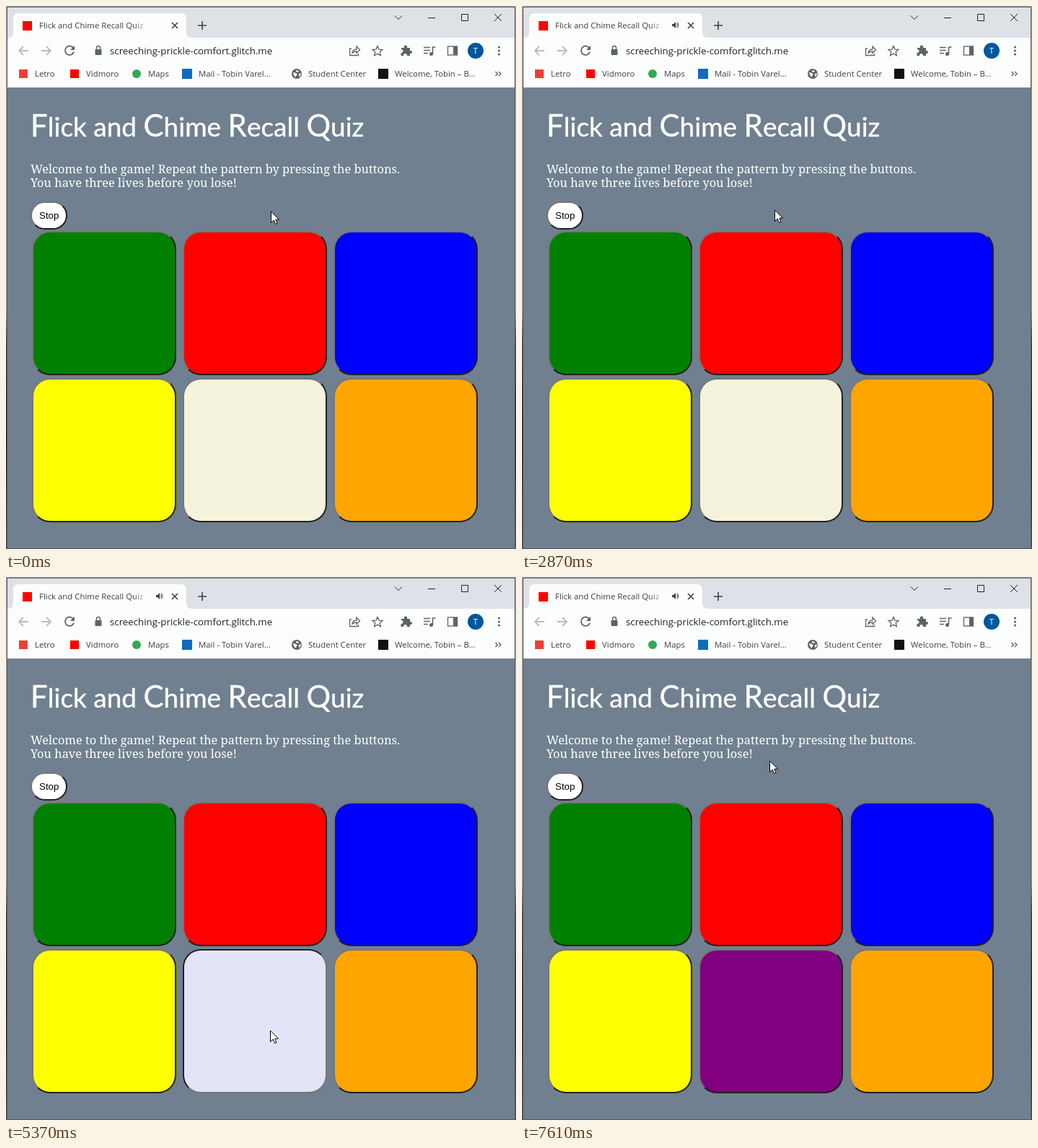
These frames come from a looping animation (707 px wide and 753 px high, 8000 ms). An HTML page:

```html
<!DOCTYPE html>
<html lang="en">
<head>
<meta charset="utf-8">
<title>Flick and Chime Recall Quiz</title>
<style>
html, body { margin: 0; width: 100%; height: 100%; overflow: hidden; }
body { position: relative; background: #708090; }
svg, .tile, .stop { position: absolute; left: 0; top: 0; }
text { font-family: "Open Sans", sans-serif; fill: #3c4043; }
.small { font-size: 11.4px; }
.address { font-size: 13.3px; fill: #202124; }
.heading { font: 37px Lato, sans-serif; fill: #fff; stroke: #fff; stroke-width: .4; }
.heading .cap { font-size: 42px; }
.intro { font: 16.4px "Noto Serif", serif; fill: #fff; }
.line { fill: none; stroke: #5f6368; stroke-width: 1.8; }
.thin { fill: none; stroke: #222; stroke-width: 1; }
.solid { fill: #5f6368; }

.tile, .stop {
  box-sizing: border-box;
  border: 2px solid;
  border-color: #767676 #212121 #212121 #767676;
}
.tile { width: 200px; height: 200px; border-radius: 25px; }
.stop {
  left: 34px; top: 271px; padding: 10px; border-radius: 25px;
  background: #fff; color: #000;
  font: 13.333px/15px "Liberation Sans", Arial, sans-serif;
}

#purple, #blue, #cursor, #speaker { animation: 8s step-end infinite; }
#purple { animation-name: purple; }
#blue { animation-name: blue; }
#cursor { animation-name: point; overflow: visible; }
#speaker { animation-name: speaker; }

@keyframes purple {
  0%, 32.375%, 86.25% { background: #f5f3dc; }
  6.875%, 43.25%, 95.125%, 100% { background: #800080; }
  20.125%, 65.625% { background: #e4e4f8; border-color: #212121 #767676 #767676 #212121; }
  21.625%, 67.5% { background: #800080; border-color: #767676 #212121 #212121 #767676; }
}
@keyframes blue {
  0%, 57.125% { background: #00f; }
  48.625% { background: #add8e6; }
  72.25% { background: #e4e4f8; border-color: #212121 #767676 #767676 #212121; }
  74.25%, 100% { background: #00f; border-color: #767676 #212121 #212121 #767676; }
}
@keyframes speaker {
  0% { opacity: 0; }
  1.5% { opacity: .5; }
  3.375%, 100% { opacity: 1; }
}
@keyframes point {
  0% { transform: translate(367px, 284px); }
  10.25% { transform: translate(364px, 330px); }
  11.75% { transform: translate(359px, 470px); }
  13.25% { transform: translate(364px, 595px); }
  14.75% { transform: translate(369px, 638px); }
  23.375% { transform: translate(369px, 600px); }
  25.125% { transform: translate(364px, 500px); }
  27% { transform: translate(357px, 390px); }
  28.75% { transform: translate(352px, 310px); }
  30.5% { transform: translate(350px, 284px); }
  32.375% { transform: translate(350px, 283px); }
  35.875% { transform: translate(350px, 282px); }
  50.5% { transform: translate(350px, 290px); }
  52.125% { transform: translate(351px, 330px); }
  53.75% { transform: translate(355px, 410px); }
  55.375% { transform: translate(360px, 510px); }
  57.125% { transform: translate(365px, 600px); }
  58.75% { transform: translate(366px, 628px); }
  69% { transform: translate(400px, 560px); }
  70.5% { transform: translate(470px, 450px); }
  72.25% { transform: translate(524px, 376px); }
  77.375% { transform: translate(498px, 312px); }
  79.25% { transform: translate(430px, 277px); }
  80.875% { transform: translate(370px, 258px); }
  82.625% { transform: translate(344px, 252px); }
  89.75% { transform: translate(344px, 253px); }
  91.625%, 100% { transform: translate(343px, 254px); }
}
</style>
</head>
<body>
<svg width="707" height="753">
  <defs>
    <linearGradient id="fade">
      <stop offset="0" stop-color="#fcfdfd" stop-opacity="0"/>
      <stop offset="1" stop-color="#fcfdfd"/>
    </linearGradient>
    <linearGradient id="edge" x2="0" y2="1">
      <stop offset="0" stop-color="#a4a6aa"/>
      <stop offset=".56" stop-color="#a4a6aa"/>
      <stop offset=".62" stop-color="#4a3438"/>
      <stop offset=".8" stop-color="#181414"/>
      <stop offset="1" stop-color="#4c4c50"/>
    </linearGradient>
  </defs>

  <!-- window and tab strip -->
  <rect width="707" height="753" fill="url(#edge)"/>
  <rect x="1" y="1" width="705" height="752" fill="#55595e"/>
  <rect x="2" y="2" width="703" height="42" fill="#dee1e6"/>
  <rect x="2" y="44" width="703" height="69" fill="#fcfdfd"/>
  <rect x="2" y="113" width="703" height="639" fill="#708090"/>
  <path d="M2 44q8 0 8-8V18q0-8 8-8H242q8 0 8 8V36q0 8 8 8Z" fill="#fcfdfd"/>
  <rect x="23" y="21" width="13" height="13" fill="#f00"/>
  <text class="small" x="46" y="31">Flick and Chime Recall Quiz</text>
  <rect x="176" y="18" width="22" height="18" fill="url(#fade)"/>
  <rect x="198" y="18" width="20" height="18" fill="#fcfdfd"/>
  <g id="speaker">
    <path d="M208 25h2l3-3v9l-3-3h-2Z" fill="#3c4043"/>
    <path d="M214.500 24.500q1.500 2 0 4M215.500 22.500q3 4 0 8" fill="none" stroke="#3c4043"/>
  </g>
  <path class="line" style="stroke:#3c4043;stroke-width:1.600" d="M230 23l8 8m0-8l-8 8M266 27h12m-6-6v12"/>
  <path class="thin" d="M539 13.500l5 5 5-5M585 16.500h10M631.500 11.500h9v9h-9ZM677 11l10 10m0-10l-10 10"/>

  <!-- toolbar -->
  <path class="line" style="stroke:#babcbe" d="M31 62H18m6-6l-6 6 6 6M49 62h13m-6-6l6 6-6 6"/>
  <path class="line" d="M93.500 58.500a6.200 6.200 0 1 0 .6 5"/>
  <path class="solid" d="M95 55v6h-6Z"/>
  <rect class="solid" x="123.500" y="60" width="9" height="8" rx="1"/>
  <path class="line" style="stroke-width:1.400" d="M125.500 60v-2a2.500 2.500 0 0 1 5 0v2"/>
  <text class="address" x="144" y="67">screeching-prickle-comfort.glitch.me</text>
  <g class="line" style="stroke-width:1.300">
    <path d="M479 59h-2.500v9.500h12V66M480 65q1-5 6-5v-4l4.500 5-4.500 4.500V63q-4 0-6 2Z"/>
    <path d="M515 55.500l2 4.600 5 .4-3.800 3.300 1.200 4.900-4.400-2.600-4.400 2.600 1.200-4.900-3.800-3.300 5-.4Z"/>
    <rect x="612.500" y="56" width="13" height="12"/>
  </g>
  <path class="solid" d="M548 58h4q-1-3.500 2-3.500t2 3.500h4v4q3-.5 3 2t-3 2v3h-4q0-3-2.500-3t-2.500 3h-3.500v-4q3 0 3-2.500t-2.500-2.500ZM620 56h6v12h-6Z"/>
  <path class="line" style="stroke-width:1.600" d="M579 57.500h9m-9 4h9m-9 4h6M591.500 66v-9h4"/>
  <circle class="solid" cx="589.500" cy="66.500" r="2.500"/>
  <circle cx="651" cy="62" r="11" fill="#00579c"/>
  <text class="small" x="651" y="66" text-anchor="middle" style="fill:#fff">T</text>
  <g class="solid">
    <circle cx="683.500" cy="57" r="1.600"/>
    <circle cx="683.500" cy="62" r="1.600"/>
    <circle cx="683.500" cy="67" r="1.600"/>
  </g>

  <!-- bookmarks -->
  <rect x="18" y="88" width="12" height="12" fill="#e94235"/>
  <rect x="89" y="88" width="12" height="12" fill="#f00"/>
  <circle cx="181" cy="94" r="6" fill="#34a853"/>
  <rect x="244" y="87" width="14" height="14" fill="#0f6cbd"/>
  <circle class="solid" cx="403" cy="94" r="7"/>
  <path d="M398 92l4 1 2 2-2 2v2l-3-3ZM402 89l4 1-1 2-3-1ZM406 94l3-1-1 4-2 1Z" fill="#fcfdfd"/>
  <rect x="516" y="87" width="14" height="14" fill="#111"/>
  <g class="small">
    <text x="40" y="98">Letro</text>
    <text x="111" y="98">Vidmoro</text>
    <text x="197" y="98">Maps</text>
    <text x="267" y="98">Mail - Tobin Varel...</text>
    <text x="419" y="98">Student Center</text>
    <text x="539" y="98">Welcome, Tobin – B...</text>
  </g>
  <path class="line" style="stroke-width:1.400" d="M678.500 91l3 3-3 3m4.500-6l3 3-3 3"/>

  <!-- page -->
  <text class="heading" x="34" y="181"><tspan class="cap">F</tspan>lick and <tspan class="cap">C</tspan>hime <tspan class="cap">R</tspan>ecall <tspan class="cap">Q</tspan>uiz</text>
  <text class="intro" x="34" y="232">Welcome to the game! Repeat the pattern by pressing the buttons.</text>
  <text class="intro" x="34" y="251">You have three lives before you lose!</text>
</svg>

<div class="stop">Stop</div>
<div class="tile" style="left:36px;top:312px;background:#008000"></div>
<div class="tile" style="left:245px;top:312px;background:#f00"></div>
<div class="tile" id="blue" style="left:454px;top:312px"></div>
<div class="tile" style="left:36px;top:516px;background:#ff0"></div>
<div class="tile" id="purple" style="left:245px;top:516px"></div>
<div class="tile" style="left:454px;top:516px;background:#ffa500"></div>

<svg id="cursor" width="12" height="19">
  <path d="M.5 1V16.500L4.200 13.100 6.600 18.500 9 17.500 6.700 12.200H11.500Z" fill="#fff" stroke="#000"/>
</svg>
</body>
</html>
```
